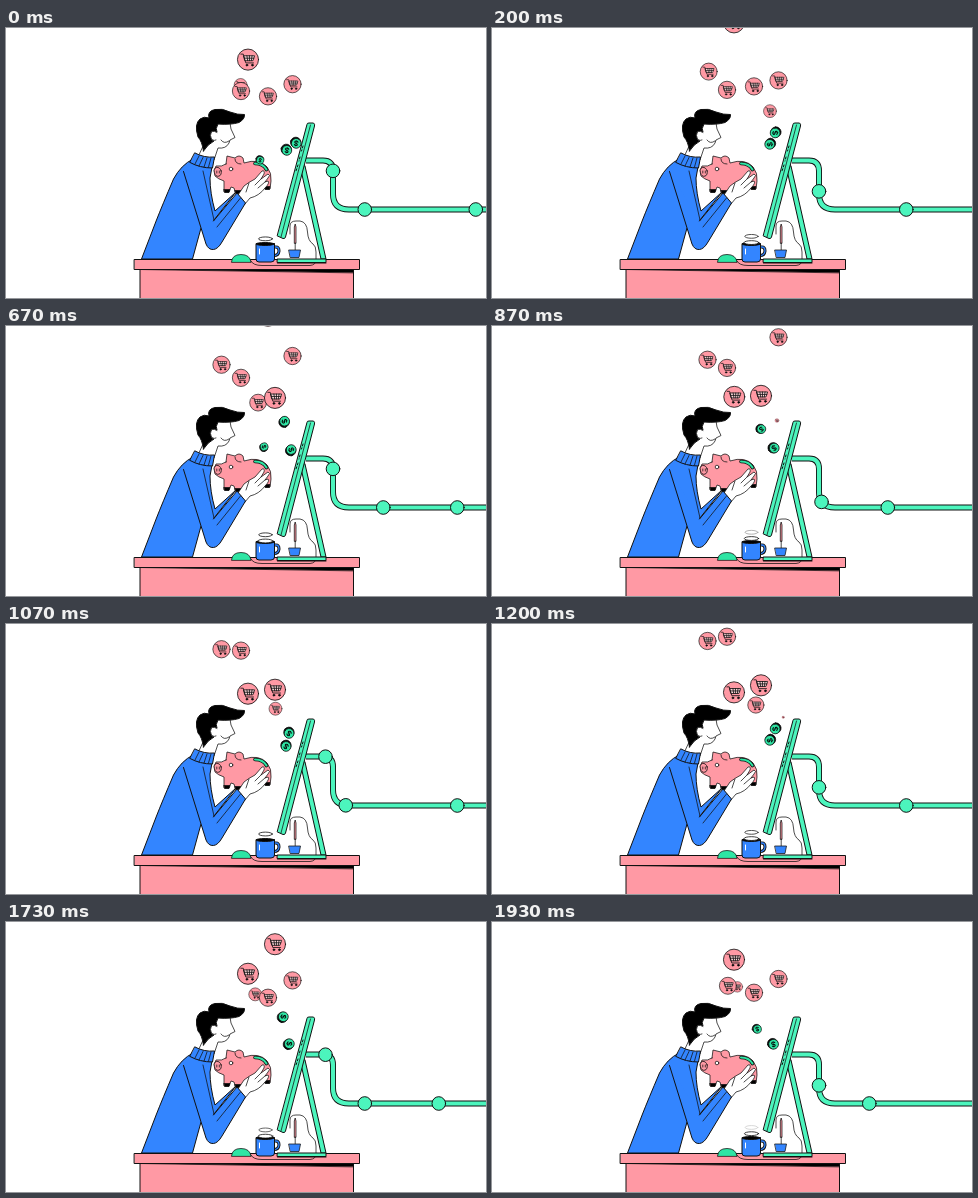
Animation of 480x270 px, one loop 1990 ms. Source, as an HTML page:

```html
<!DOCTYPE html>
<html lang="en">
<head>
<meta charset="utf-8">
<title>Saving while shopping</title>
<style>
html, body { margin: 0; width: 100%; height: 100%; overflow: hidden; background: #fff; }
svg { display: block; width: 100vw; height: 100vh; }
.ink { stroke: #111; stroke-width: 1; stroke-linejoin: round; stroke-linecap: round; }
.pink { fill: #ff99a4; }
.green { fill: #2ee5a4; }
.mint { fill: #4cf5bd; }
.blue { fill: #3385ff; }
.white { fill: #fff; }
.none { fill: none; }
.thin { stroke-width: .75; }
text { font: bold 8px Arial, "Liberation Sans", sans-serif; text-anchor: middle; }
</style>
</head>
<body>
<svg viewBox="0 0 480 270">
  <defs>
    <path id="pipe" d="M300 132.500H317Q327 132.500 327 143V166Q327 181.500 343 181.500H560"/>
  </defs>
  <use href="#pipe" fill="none" stroke="#111" stroke-width="6"/>
  <use href="#pipe" fill="none" stroke="#4cf5bd" stroke-width="4.200"/>
  <g id="balls" class="ink mint"></g>

  <!-- desk -->
  <g class="ink">
    <path class="pink" d="M134 241V275H347.500V241Z"/>
    <path class="thin" d="M134 241.500H347.500V244.500Z"/>
    <path class="pink" d="M128.500 231.500H353.500V241.500H128.500Z"/>
  </g>

  <!-- cable, mouse, pen pot -->
  <g class="ink thin none">
    <path d="M245 233Q247 237.500 256 237.500H304Q310 237 310 232"/>
    <path d="M284 206V198Q284 193 290 193H294Q301 194 301.500 204Q302 213 307 216Q310 218 310 224V231"/>
    <path class="green" d="M225.500 234Q226 226.500 235 226.500Q244 226.500 245 234Z"/>
    <path class="pink" d="M288.300 215V199L289.200 196L290 199V215Z"/>
    <path d="M289.200 215V222"/>
    <path class="blue" d="M283 222H294.500L293 229.500H284.500Z"/>
  </g>

  <!-- cup -->
  <g class="ink">
    <path class="none" d="M268 219H270Q273 219 273 223Q272.500 227.500 268 227.500" stroke-width="3"/>
    <path class="none" d="M268 219H270Q273 219 273 223Q272.500 227.500 268 227.500" style="stroke:#3385ff;stroke-width:1.300"/>
    <path class="blue" d="M250 216V231Q250 234 253 234H265Q268.500 234 268.500 231V216Z"/>
    <ellipse cx="259.200" cy="216" rx="9.200" ry="1.500"/>
    <path class="none" d="M253.500 221V226" style="stroke:#fff"/>
  </g>
  <g id="steam" class="ink white"></g>

  <!-- man -->
  <g class="ink">
    <path class="white thin" d="M213 94L224 95L225 101L229 109.500L224 112L223 115Q220 121 212 120L208 132L192 129L198 116Z"/>
    <path class="none thin" d="M215 112Q218 116.500 223 113"/>
    <path d="M197.500 123Q196 113 192 109Q188 96 194 91Q198 88 203 90Q201 83 209 81.500Q216 80 224 84Q232 87 238.500 86.500Q239 91 233 94.500Q225 97 212 96Q209 101 211 104Q205 101 204 107Q205 112 208 113Q202 116 197.500 123Z"/>
    <path class="white thin" d="M211 104.500Q205 101 204.500 107.500Q205.500 114 210 112"/>
    <path class="blue" d="M187 131Q175 137 167.500 151Q156 178 150.500 192L135.500 231H186.500L195 200L208 192L230 164L209 183Q204 165 204 150L206 139Z"/>
    <path class="blue" d="M189 125Q198 130 208.500 129L206.500 140Q194 140 184 134.500Z"/>
    <path class="none thin" d="M193 128L189 136M197 129.500L193 138M201 130L198 139M205 130L202.500 139"/>
  </g>

  <!-- piggy bank -->
  <g class="ink thin">
    <path class="pink" d="M220 136L221 128L229 130Q233 126 237 130L238 135Q253 130 261 139Q266 145 265 153L264 161H259L256 157Q246 163 238 160L235 165H229.500L228 160L225 159L223 164H218L218 153Q212 151 209 148Q207 142 210 138Q216 139 220 136Z"/>
    <path d="M218 161.500H224L223 164.500H219ZM229 162.500H236L235 165.500H230ZM258.500 158.500H264L263.500 161.500H259.500Z"/>
    <ellipse class="pink" cx="211.800" cy="144" rx="3.500" ry="4.500" transform="rotate(-15 211 144)"/>
    <path class="none" d="M210.800 143V145M213.300 143V145M229 131Q229 136 235 136"/>
    <circle class="white" cx="225" cy="141" r="1.800"/>
    <path class="none" d="M249 135.500Q257 135.500 260.500 141.500" style="stroke-width:3.600"/>
    <path class="none" d="M249 135.500Q257 135.500 260.500 141.500" style="stroke:#2ee5a4;stroke-width:2"/>
  </g>

  <!-- arm and hand -->
  <g class="ink">
    <path class="white thin" d="M232 167L238 158Q243 154 249 151L256 143Q259 142 258 146L255 151L262 146Q265 147 262 150L259 154L262 153Q264 155 259 160Q253 168 244 170L239 176Z"/>
    <path class="none thin" d="M255 151L249 157M259 154L252 160M243 155L240 164"/>
    <path class="blue" d="M177.500 143.500L200 216Q202.500 222 207.500 221.500Q212 221 216 214L239.500 175L231 165L207.500 193"/>
    <path class="none thin" d="M197 143L208 192M234.500 170L211 199"/>
  </g>

  <g id="coins" class="ink thin"></g>
  <g id="carts" class="ink thin"></g>

  <!-- monitor -->
  <g class="ink mint">
    <path d="M294.500 140L315 231H320L299 138Z"/>
    <path d="M301 96Q301 95 303 95H307.500Q309 96 308.500 98L279.500 209Q279 211 277 210.500L271.500 208Z"/>
    <path class="none thin" d="M304.500 97L275 209"/>
    <path class="none" d="M297 118L295.500 123M294 129L293 133M292 137L290 143" stroke-dasharray="2 2"/>
    <path d="M271.500 231H320V234.500H271.500Z"/>
    <path class="none" d="M271.500 235H320"/>
  </g>
</svg>
<script>
const LOOP = 1990, FRAMES = 30, BEAT = 15;
const $ = id => document.getElementById(id);
const pipe = $("pipe");

// distance along the pipe for the last steps before the screen
const bend = [10, 19.5, 33.5, 54, 67, 79];
const arrivals = [2, 6, 12];

// born, rest x, rest y, radius
const carts = [
  [0, 269, 73, 11], [5.6, 242, 71, 11], [12, 262, 80, 9],
  [17.4, 286.5, 59, 9], [22, 235, 63.5, 9], [26, 215.5, 43, 9]
];
const screen = { x: 292, y: 99 };

// step, x, y, radius
const coinTracks = [
  [[0, 290, 115, 6], [1, 283, 109, 6], [6, 284, 98, 6], [11, 277, 95, 6], [14, 265, 107, 5], [15, 254, 132, 4.5]],
  [[10, 285, 124, 6], [11, 283, 122, 6], [16, 280, 122, 6], [21, 275, 107, 6], [23, 267, 104, 5.5], [25, 258, 121, 4.7]]
];

const circle = (x, y, r, attr = "") => `<circle cx="${x}" cy="${y}" r="${r}" ${attr}/>`;

function ballsAt(step) {
  let out = "";
  for (const a of arrivals) for (const m of [a - step, a - step + BEAT]) {
    if (m < 0) continue;
    const p = pipe.getPointAtLength(bend[m] ?? 98 + (m - 6) * 18.5);
    out += circle(p.x, p.y, 6.8);
  }
  return out;
}

function cartAt(age, x, y, r) {
  const left = Math.max(0, 1 - age / 8) ** 2;   // eased flight out of the screen
  const rise = age ** 4 / 9000 + Math.max(0, age - 26) * 10;
  const cx = x + (screen.x - x) * left, cy = y + (screen.y - y) * left - rise;
  if (cy < -15) return "";
  return `<g transform="translate(${cx} ${cy}) scale(${r * (1 - left) / 10})">
    ${circle(0, 0, 9.6, 'class="pink"')}
    <path fill="#ffdadd" d="M-3.800 -3.500H6L4.500 1H-2.600Z"/>
    <path class="none" d="M-6.500 -5H-4.300L-2 3H5M-3.200 -1.300H5.300M-1 -3.500L-.3 1M1.300 -3.500V1M3.700 -3.500L3 1"/>
    ${circle(-1, 5, .8)}${circle(4, 5, .8)}</g>`;
}

function cartsAt(n) {
  return carts.map(([born, ...rest]) => [(n - born + FRAMES) % FRAMES, rest])
    .sort((a, b) => a[0] - b[0])
    .map(([age, rest]) => cartAt(age, ...rest)).join("");
}

function coinAt(track, t) {
  const i = track.findIndex(k => k[0] >= t);
  if (i < 0 || t < track[0][0]) return "";
  const b = track[i], a = track[Math.max(0, i - 1)];
  const u = i ? (t - a[0]) / (b[0] - a[0]) : 0;
  const [, x, y, r] = a.map((v, k) => v + (b[k] - v) * u);
  return `<g transform="translate(${x} ${y}) rotate(${t * 24 - 165}) scale(${r / 6})">
    ${circle(.5, .5, 5.2)}${circle(-.3, -.3, 4.9, 'class="green"')}
    <text x="-.3" y="2.500" stroke="none">$</text></g>`;
}

function steamAt(step) {
  return [5, 12.5].map(shift => {
    const age = (step + shift) % BEAT;
    if (age > 11.5) return "";
    return `<ellipse cx="259.500" cy="${215 - age * .83}" rx="${7.5 - age * .1}" ry="1.900" stroke-width=".8" opacity="${Math.min(1, (12.5 - age) / 5)}"/>`;
  }).join("");
}

const start = performance.now();
function draw(now) {
  const t = Math.max(0, now - start) % LOOP;
  const n = Math.floor(t / LOOP * FRAMES + .1) % FRAMES;
  const step = n % BEAT;
  $("balls").innerHTML = ballsAt(step);
  $("carts").innerHTML = cartsAt(n);
  $("coins").innerHTML = coinTracks.map(k => coinAt(k, step) + coinAt(k, step + BEAT)).join("");
  $("steam").innerHTML = steamAt(step);
  requestAnimationFrame(draw);
}
draw(start);
</script>
</body>
</html>
```
